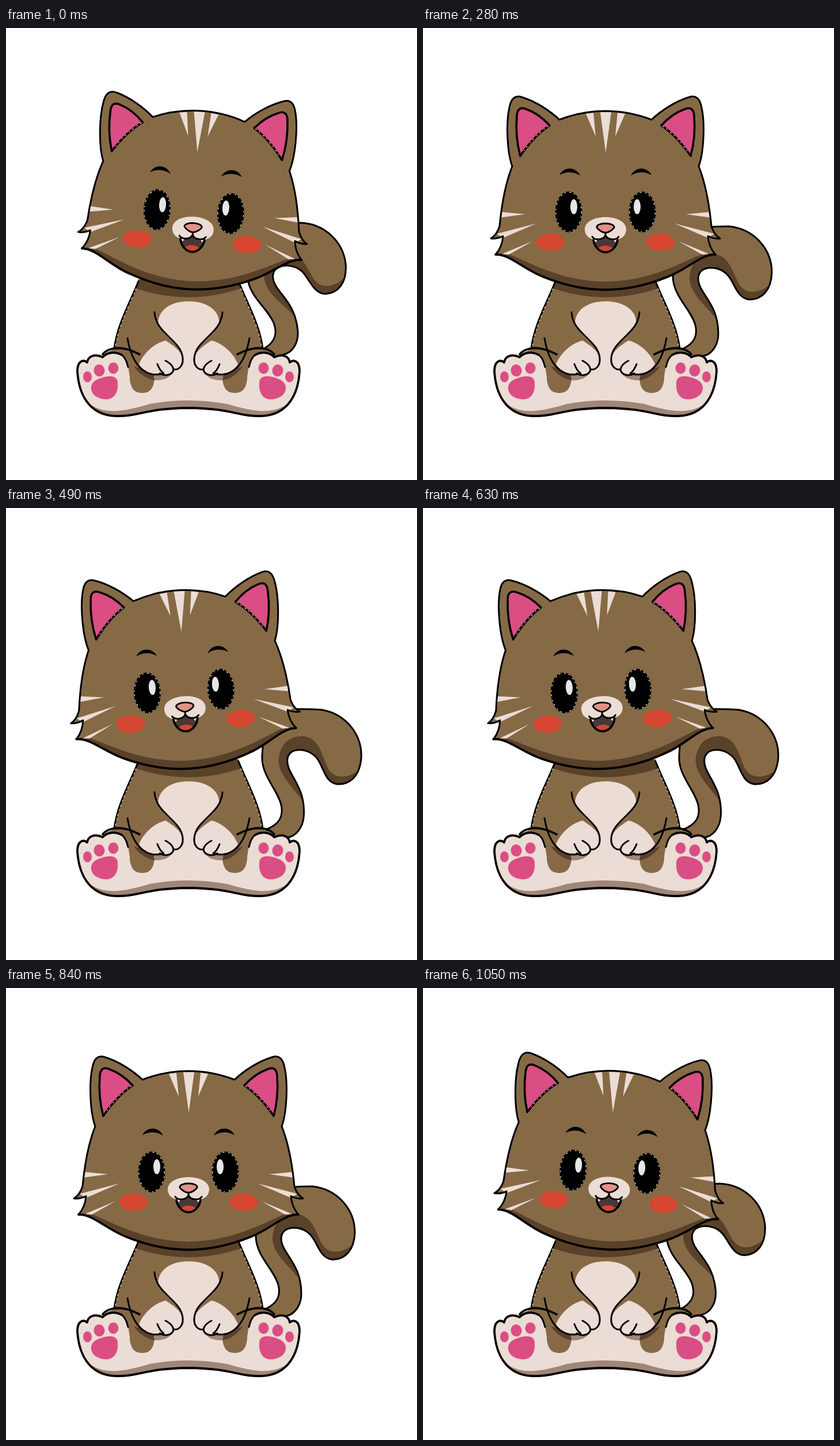
An HTML page for the animation above (1120 ms loop, 714 by 784 pixels).

```html
<!DOCTYPE html>
<html lang="en">
<head>
<meta charset="utf-8">
<title>Kitten</title>
<style>
html, body { margin: 0; width: 100%; height: 100%; overflow: hidden; background: #fff; }
svg { display: block; width: 714px; height: 784px; }
.fur { fill: #866a46; }
.dark { fill: #5a4129; }
.cream { fill: #ebdcd5; }
.shade { fill: #a08676; }
.pink { fill: #da4e83; }
.red { fill: #d5452f; }
.line { fill: none; stroke: #000; stroke-width: 3; stroke-linecap: round; stroke-linejoin: round; }
.thick { stroke-width: 3.8; }
.fleck { fill: none; stroke: #fff; stroke-width: 1.2; stroke-dasharray: 3 5 2 7; }
</style>
</head>
<body>
<svg id="stage" viewBox="0 0 714 784"></svg>
<script>
const STEP = 70, STEPS = 16;
const HEAD_TILT = [3, 2.5, 1.8, 1, 0, -1.25, -2.2, -2.9, -3.3];

const path = (cls, d) => `<path class="${cls}" d="${d}"/>`;
const oval = (cls, cx, cy, rx, ry, turn = 0) =>
  `<ellipse class="${cls}" cx="${cx}" cy="${cy}" rx="${rx}" ry="${ry}" transform="rotate(${turn} ${cx} ${cy})"/>`;
const clip = (id, d) => `<clipPath id="${id}"><path d="${d}"/></clipPath>`;
const clipped = (id, content) => `<g clip-path="url(#${id})">${content}</g>`;
const both = half => half + `<g transform="translate(634) scale(-1 1)">${half}</g>`;

const tailShape = `M465 380 L473 347 C495 345 515 344 532 344 C577 349 606 385 606 424
  C605 455 589 471 567 471 C548 469 543 449 534 435 C526 421 511 415 497 416
  C478 418 474 433 482 450 C492 470 513 488 513 530 C513 552 500 567 486 569
  L448 580 L450 557 C470 548 478 535 473 515 C466 488 434 465 434 430 L434 385Z`;

function tail() {
  return clip('tailClip', tailShape) + path('fur', tailShape) +
    clipped('tailClip', path('dark', `M508 503 C490 480 465 462 463 436 C463 408 480 391 506 392
      C531 396 537 420 546 438 C557 465 584 461 604 444 L600 480 L560 480 L530 437 L497 418 L480 425Z`)) +
    path('line', tailShape);
}

const rump = `M124 595 C126 632 142 671 190 673 C232 674 240 660 317 659
  C394 660 402 674 444 673 C492 671 508 632 510 595 C510 578 500 574 493 580
  C491 568 479 565 466 571 L400 590 L234 590 L168 571 C155 565 143 568 141 580 C134 574 124 578 124 595Z`;
const torso = `M230 436 C215 475 192 515 188 557 L170 565 L196 570 L206 602
  L214 602 C216 625 222 633 237 633 C252 633 258 622 258 604 L376 604 C376 622 382 633 397 633
  C412 633 418 625 420 602 L428 602 L438 570 L464 565 L446 557 C442 515 419 475 404 436Z`;
const belly = `M264 513 C264 490 285 474 317 474 C349 474 372 490 370 513 C360 538 330 548 327 570
  C326 585 335 594 343 593 L376 606 L376 630 L258 630 L258 606 L291 593 C299 594 308 585 307 570 C304 548 274 538 264 513Z`;

function bodyHalf() {
  const foot = `M124 595 C124 578 134 574 141 580 C143 568 155 565 168 571 C176 562 190 561 201 567
    C210 573 213 588 215 606 L216 640 L140 645Z`;
  const hand = `M231 583 C240 562 258 547 277 542 C290 550 304 560 307 572
    C308 585 300 594 291 592 C290 601 277 604 268 599 C250 603 238 595 231 583Z`;
  return path('cream', foot) +
    path('dark', 'M222 587 C234 603 246 609 258 611 L262 598Z') +
    path('shade', 'M256 600 L291 594 C289 604 276 612 258 611Z') +
    path('cream', hand) +
    path('line', 'M230 440 C215 477 193 515 188 556') +
    path('fleck', 'M226 452 C211 487 195 520 190 552') +
    path('line', 'M258 493 C260 531 305 541 307 573 C308 586 300 594 291 592 C290 602 276 605 267 599') +
    path('line', 'M211 538 C216 567 226 588 244 597 C254 603 264 601 272 600') +
    path('line', 'M277 577 C285 581 290 587 291 592 M263 583 C266 591 269 596 274 599') +
    path('line thick', 'M168 566 C175 556 193 553 209 557 C218 559 226 563 232 566') +
    path('line thick', 'M124 595 C124 578 134 574 141 580 C143 568 155 565 168 571 C176 562 190 561 201 567') +
    path('line', 'M201 567 C207 571 210 579 212 588') +
    oval('pink', 141.5, 605, 7.5, 9.5) + oval('pink', 162, 594, 9.5, 10.5, -12) + oval('pink', 186.5, 590, 9, 10) +
    path('pink', `M148 623 C149 612 160 609 168 606 C181 602 195 603 194 617
      C195 636 185 645 172 644 C158 643 147 635 148 623Z`);
}

function body() {
  return clip('rumpClip', rump) + clip('torsoClip', torso) +
    path('cream', rump) +
    clipped('rumpClip', path('shade', `M130 640 C165 676 205 665 250 652 C295 644 339 644 384 652
      C429 665 469 676 504 640 L510 690 L124 690Z`)) +
    path('fur', torso) +
    clipped('torsoClip', path('dark', 'M210 430 L210 446 Q317 488 424 446 L424 430Z')) +
    path('cream', belly) + both(bodyHalf()) +
    path('line thick', `M124 595 C126 632 142 671 190 673 C232 674 240 660 317 659
      C394 660 402 674 444 673 C492 671 508 632 510 595`);
}

const headHalf = `M317 144 C290 144 263 149 237 159 C220 143 195 127 172 120
  C160 116 153 122 150 138 C144 165 146 215 155 240 C143 270 137 302 133 344
  C130 353 125 361 118 365 C126 366 133 364 139 361 C138 375 133 385 126 393
  C151 392 175 419 210 432 C245 446 280 454 317 454`;

function faceHalf() {
  return path('dark', `M126 393 C133 391 140 390 147 391 C190 409 240 439 318 440
      L318 454 C280 454 245 446 210 432 C175 419 151 392 126 393Z`) +
    path('cream', 'M283 149 L296 147 L300 188Z') +
    path('cream', 'M135 319 L177 323 L133 329Z M128 357 L197 339 L139 364Z M137 392 L190 370 L149 393Z') +
    path('line', headHalf) +
    path('line thick', 'M126 393 C151 392 175 419 210 432 C245 446 280 454 317 454') +
    `<g stroke="#000" stroke-width="3.6" stroke-linejoin="round">` +
    path('pink', `M163 152 C164 139 171 137 180 141 C197 147 210 158 220 169
      C199 183 184 200 169 222 C163 200 161 176 163 152Z`) + `</g>` +
    path('fleck', 'M218 170 C198 184 184 200 171 219') +
    path('', 'M237 255 C245 240 265 240 273 256 C262 249 250 248 237 255Z') +
    oval('', 253, 319, 23.5, 35.5) + oval('fleck', 253, 319, 22.3, 34.3) +
    `<ellipse cx="262" cy="310" rx="6" ry="13" fill="#e6e6e6"/>` +
    oval('red', 221.5, 371.5, 24.8, 15);
}

function head() {
  return both(path('fur', headHalf)) +
    `<rect class="fur" x="315" y="145" width="4" height="307"/>` +
    both(faceHalf()) +
    path('cream', 'M308 146 L327 146 L317.5 216Z') +
    path('cream', `M317 328 C338 328 353 337 353 349 C353 361 343 368 331 367
      L317 362 L303 367 C291 368 281 361 281 349 C281 337 296 328 317 328Z`) +
    `<path d="M295 365 C304 369 314 366 317 360 C320 366 330 369 339 365 C337 380 328 389 317 389 C306 389 297 380 295 365Z" fill="#493936"/>` +
    path('red', 'M304 382 C311 376 323 376 330 382 C323 390 311 390 304 382Z') +
    `<path d="M297 366 l6 1 l-3 5Z M337 366 l-6 1 l3 5Z" fill="#fff"/>` +
    path('line', 'M294 362 C299 369 314 368 317 359 C320 368 335 369 340 362 M317 354 V360') +
    path('line thick', 'M296 368 C298 380 307 389 317 389 C327 389 336 380 338 368') +
    `<path d="M317 339 C326 339 333 342 332 346 C330 350 322 355 317 355 C312 355 304 350 302 346 C301 342 308 339 317 339Z"
      fill="#e29088" stroke="#000" stroke-width="2.8"/>`;
}

const stage = document.getElementById('stage');
stage.innerHTML = `<g id="tail">${tail()}</g><g>${body()}</g><g id="head">${head()}</g>`;
const tailGroup = document.getElementById('tail');
const headGroup = document.getElementById('head');

function draw(time) {
  const step = Math.floor(time / STEP) % STEPS;
  const swing = Math.min(step, STEPS - step);
  const tilt = HEAD_TILT[swing];
  const lift = (tilt / 3) ** 2;
  tailGroup.setAttribute('transform', `rotate(${1.25 * swing - 5} 450 598)`);
  headGroup.setAttribute('transform', `translate(${0.8 * lift} ${-1.4 * lift}) rotate(${tilt} 307 485)`);
}

const start = performance.now();
function tick() {
  draw(performance.now() - start);
  requestAnimationFrame(tick);
}
tick();
</script>
</body>
</html>
```
